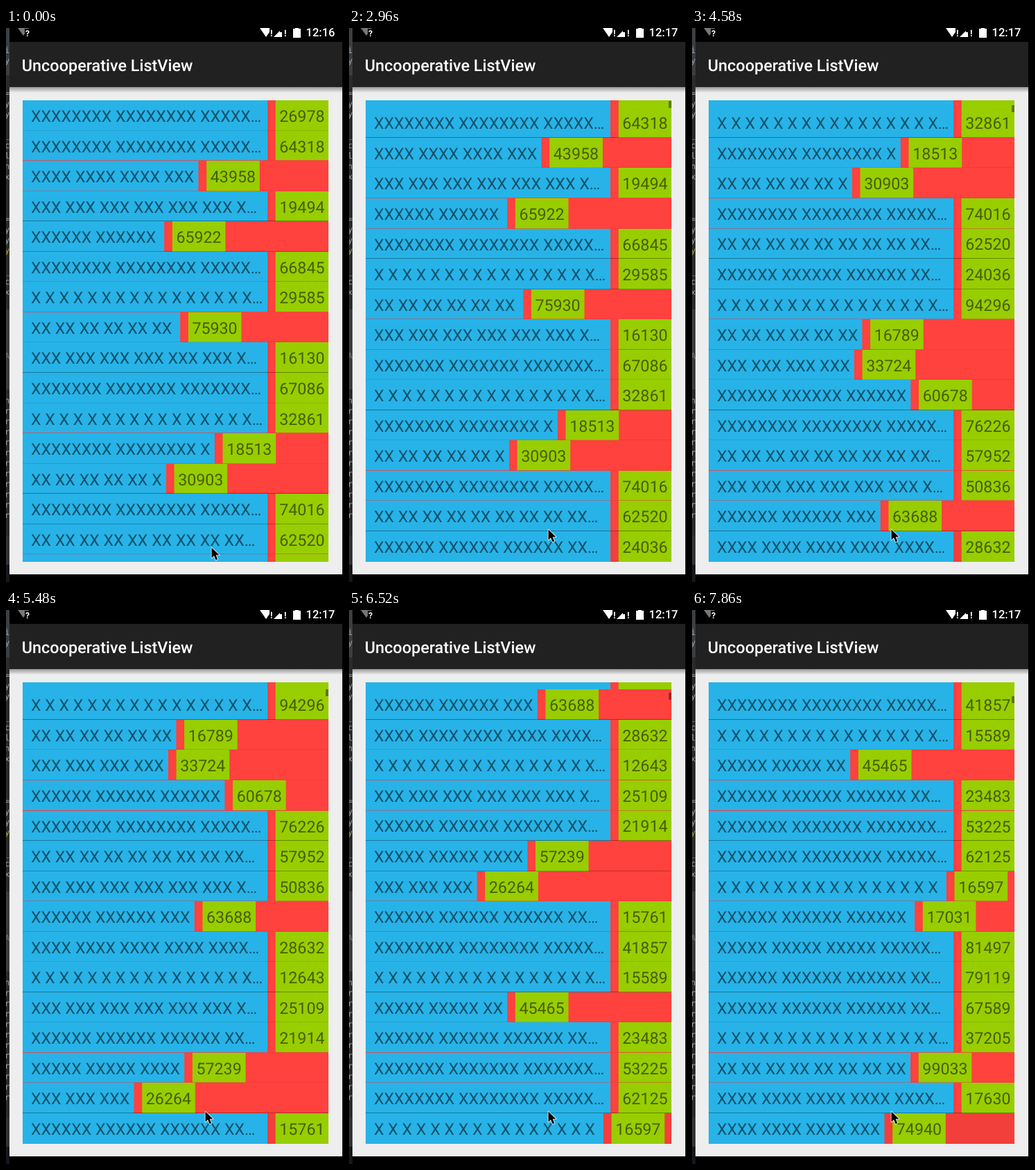
Write an HTML page with a canvas that moves like this. It is 486x797 px and loops after 8 s.

```html
<!DOCTYPE html>
<html lang="en">
<head>
<meta charset="utf-8">
<title>Uncooperative ListView</title>
<style>
html, body { margin: 0; width: 486px; height: 797px; overflow: hidden; background: #000; }
canvas { display: block; }
</style>
</head>
<body>
<canvas id="stage" width="486" height="797"></canvas>
<script>
const ctx = document.getElementById('stage').getContext('2d');
const LOOP = 8000;
const PITCH = 43.55;
const LIST = { left: 24, top: 104, right: 465, bottom: 768 };
const SHIFTED_TOP = 114.3; // top of the first full row once the list is bottom-aligned
const RED = '#ff423e', BLUE = '#27b3e8', GREEN = '#98cd00', INK = 'rgba(0,0,0,.54)';

// "number wordLength [textLength]"; rows without a text length overflow and get an ellipsis
const rows = `26978 8,64318 8,43958 4 18,19494 3,65922 6 14,66845 8,29585 1,75930 2 18,
16130 3,67086 7,32861 1,18513 8 19,30903 2 16,74016 8,62520 2,24036 6,94296 1,16789 2 17,
33724 3 15,60678 6 20,76226 8,57952 2,50836 3,63688 6 17,28632 4,12643 1,25109 3,21914 6,
57239 5 16,26264 3 11,15761 6,41857 8,15589 1,45465 5 14,23483 6,53225 7,62125 8,16597 1 32,
17031 6 21,81497 5,79119 6,67589 6,37205 1,99033 2 23,17630 4,74940 4 18`
  .split(',').map(entry => {
    const [number, word, length] = entry.trim().split(' ');
    const cut = [0, 31, 26, 25, 24, 23, 23, 23, 23][word];
    const text = ('X'.repeat(word) + ' ').repeat(20).slice(0, length || cut);
    return { number, text: length ? text : text + '…', overflow: !length };
  });

// start, end, step count, first full row after the opening step
const bursts = [
  [2960, 3410, 4, 1], [3850, 4880, 8, 5], [5030, 5480, 4, 13],
  [5780, 6520, 6, 18], [6810, 6810, 1, 25], [7110, 7860, 6, 26]
];
const scrollSteps = bursts.flatMap(([start, end, count, first]) =>
  Array.from({ length: count }, (_, i) => [
    Math.floor((start + (end - start) * i / Math.max(1, count - 1)) / 10) * 10, first + i
  ]));
const pointerSteps = [[0, [296, 747]], [140, [291, 732]], [290, [287, 721]]];

function valueAt(steps, t, initial) {
  let value = initial;
  for (const [time, next] of steps) if (t >= time) value = next;
  return value;
}

function rect(color, x0, y0, x1, y1) {
  ctx.fillStyle = color;
  ctx.fillRect(x0, y0, x1 - x0, y1 - y0);
}

function label(text, x, y, size, color, weight = 400, family = 'Roboto, sans-serif') {
  ctx.font = `${weight} ${size}px ${family}`;
  ctx.fillStyle = color;
  ctx.fillText(text, x, y);
}

function shape(color, ...points) {
  ctx.fillStyle = color;
  ctx.beginPath();
  for (const [x, y] of points) ctx.lineTo(x, y);
  ctx.closePath();
  ctx.fill();
}

function drawEditorEdge() {
  ctx.save();
  ctx.beginPath();
  ctx.rect(0, 0, 5, 797);
  ctx.clip();
  rect('#2b2b2b', 0, 0, 5, 797);
  rect('#3c3f41', 0, 0, 5, 68);
  rect('#3b3d3f', 0, 405, 5, 520);
  rect('#313335', 0, 730, 5, 772);
  rect('#15171c', 0, 772, 5, 797);
  const column = (lines, y, color = '#9aa4ac') =>
    lines.forEach((line, i) => label(line, -2, y + i * 15, 12, color, 400, '"DejaVu Sans Mono", monospace'));
  column(['it', 'y'], 36);
  column(['=', 'y', 'y', '', '_d', 'c', 'l', 'n', 'x'], 98);
  column(['=', 'y', 'y'], 279);
  column(['y'], 324, '#a9a53c');
  column(['_d', 'c', 'x'], 354);
  column(['A'], 476, '#777');
  column(['n', 'ra', 'ra', 'ra', 'ra', 'ra', 'ra', 'ra', 'ra', 'ra', 'ra', 'ra'], 540);
  ctx.restore();
}

function drawStatusBar(t) {
  rect('#000', 5, 0, 485, 20);
  shape('#777', [17, 0], [33, 0], [25, 11]);
  rect('#000', 27, 1, 36, 13);
  label('?', 28, 12, 12, '#fff', 700);
  shape('#fff', [366, 0], [384, 0], [375, 13]);
  rect('#000', 380, 0, 385, 14);
  label('!', 381, 12, 13, '#fff', 700);
  shape('#fff', [386, 13], [398, 1], [398, 13]);
  rect('#000', 395, 0, 399, 6);
  label('!', 401, 12, 13, '#fff', 700);
  rect('#fff', 414, 1, 425, 14);
  rect('#fff', 417, 0, 422, 1);
  label(t < 1920 ? '12:16' : '12:17', 432.5, 12, 16.5, '#fff', 500);
}

function drawAppBar() {
  rect('#212121', 5, 20, 485, 85);
  label('Uncooperative ListView', 22.8, 62, 23.4, '#fff', 500);
  const shadow = ctx.createLinearGradient(0, 85, 0, 93);
  shadow.addColorStop(0, 'rgba(0,0,0,.36)');
  shadow.addColorStop(1, 'rgba(0,0,0,0)');
  rect(shadow, 5, 85, 485, 93);
}

function drawRow(row, top, selected) {
  const y0 = Math.round(top), y1 = Math.round(top + PITCH), baseline = Math.round(top + 31);
  if (selected) rect('rgba(0,0,0,.05)', LIST.left, y0, LIST.right, y1);
  ctx.font = '400 23.2px Roboto, sans-serif';
  const end = row.overflow ? 377 : 36 + ctx.measureText(row.text).width + 6.2;
  const badge = end + 11.7;
  rect(BLUE, LIST.left, y0, end, y1);
  rect(GREEN, badge, y0, Math.min(badge + 76.6, LIST.right), y1);
  label(row.text, 36, baseline, 23.2, INK);
  label(row.number, badge + 5.6, baseline, 23.2, INK);
}

// Downscaled hairlines alternate between dark, red and faint every nine rows
const hairlines = {
  D: 'rgba(0,0,0,.34)', d: 'rgba(0,0,0,.26)', f: 'rgba(0,0,0,.09)',
  R: 'rgba(245,60,62,.8)', r: 'rgba(225,60,70,.5)'
};
function drawDividers(base) {
  for (let i = 0; i < 16; i++) {
    const y = Math.round(base + i * PITCH) - 1;
    if (y < 765) rect(hairlines['DfRrDdrRf'[i % 9]], LIST.left, y, LIST.right, y + 1);
  }
}

function drawList(t) {
  const first = valueAt(scrollSteps, t, 0);
  const origin = first ? SHIFTED_TOP - first * PITCH : LIST.top;
  ctx.save();
  ctx.beginPath();
  ctx.rect(LIST.left, LIST.top, LIST.right - LIST.left, LIST.bottom - LIST.top);
  ctx.clip();
  rect(RED, LIST.left, LIST.top, LIST.right, LIST.bottom);
  rows.forEach((row, i) => {
    const top = origin + i * PITCH;
    if (top + PITCH > LIST.top && top < LIST.bottom - 0.6) drawRow(row, top, first && i === first + 14);
  });
  drawDividers(first ? SHIFTED_TOP + PITCH : LIST.top);
  if (t >= 1480) {
    const y = Math.round(LIST.top + first * 0.65);
    rect('rgba(0,0,0,.4)', 461, y, 465, y + 10);
  }
  ctx.restore();
}

function drawPointer(t) {
  const [x, y] = valueAt(pointerSteps, t);
  const outline = new Path2D('M.5 .5V15.5L4 12.3L6.6 18.4L9.2 17.3L6.7 11.3H11.5Z');
  ctx.save();
  ctx.translate(x, y);
  ctx.lineWidth = 1.6;
  ctx.lineJoin = 'round';
  ctx.strokeStyle = '#fff';
  ctx.stroke(outline);
  ctx.fillStyle = '#000';
  ctx.fill(outline);
  ctx.restore();
}

function render(t) {
  rect('#000', 0, 0, 486, 797);
  drawEditorEdge();
  rect('#eee', 5, 85, 485, 786);
  drawStatusBar(t);
  drawAppBar();
  drawList(t);
  drawPointer(t);
}

ctx.textRendering = 'geometricPrecision';
const begin = performance.now();
function tick() {
  render((performance.now() - begin) % LOOP);
  requestAnimationFrame(tick);
}
tick();
</script>
</body>
</html>
```
